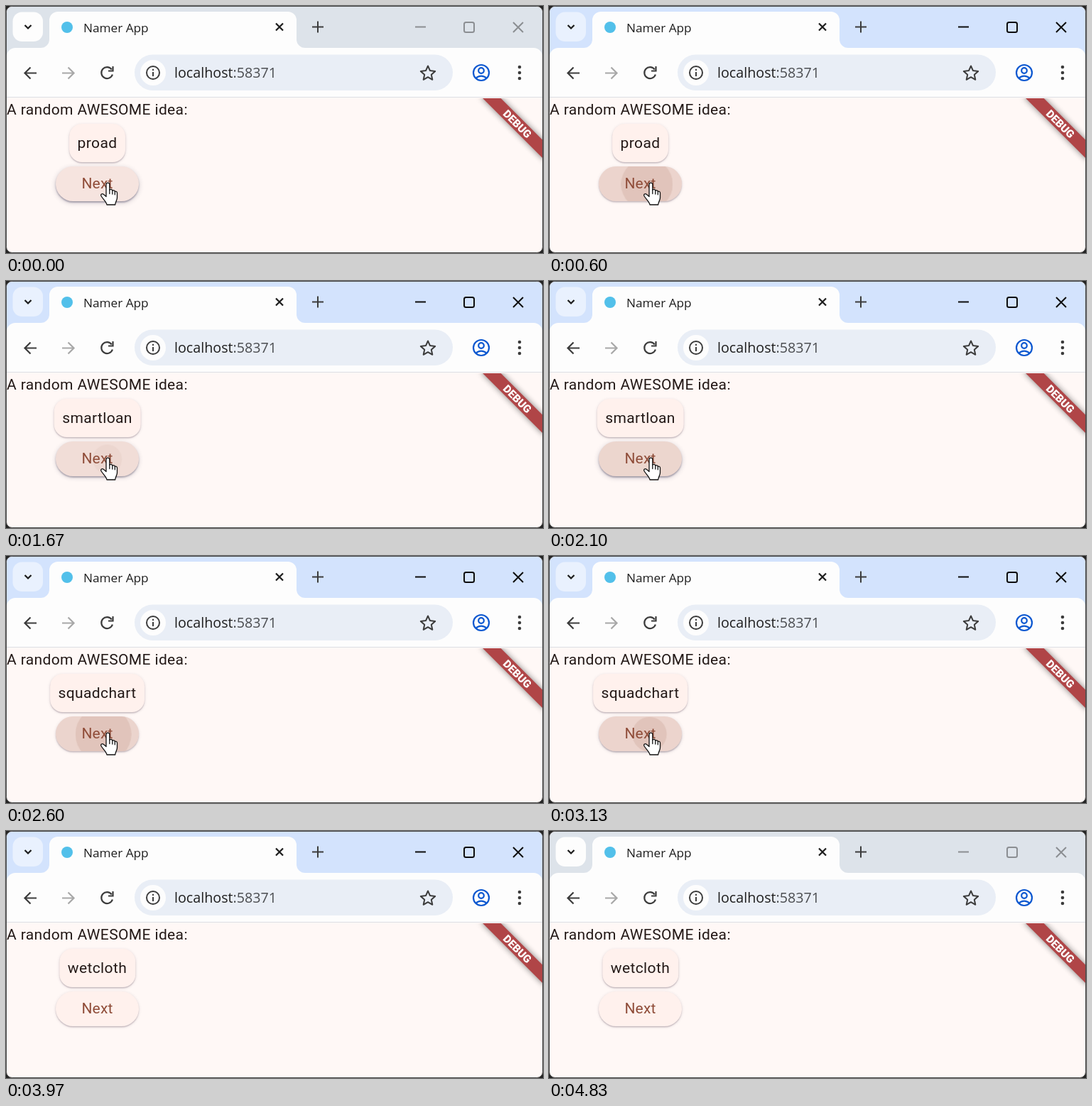
Animation, 756 px wide and 348 px high, one loop 4860 ms. Source, as an HTML page:

```html
<!DOCTYPE html>
<html lang="en">
<head>
<meta charset="utf-8">
<title>Namer App</title>
<style>
  html, body { margin: 0; width: 100%; height: 100%; overflow: hidden; background: #222; }
  :root {
    --loop: 4860ms;
    --flat: 0 1.5px 1.5px rgba(70, 50, 70, .24), 0 1px 4px rgba(70, 50, 70, .14);
    --raised: 0 2px 2px rgba(50, 45, 75, .32), 0 2px 7px rgba(50, 45, 75, .24);
  }
  #stage { position: absolute; left: 0; top: 0; width: 756px; height: 348px; overflow: hidden; }
  svg { position: absolute; left: 0; top: 0; }
  .ui { font-family: "Open Sans", "Noto Sans", sans-serif; }
  .app { font: 21px/30px Roboto, sans-serif; letter-spacing: .375px; color: #231917; white-space: nowrap; }
  .line { fill: none; stroke: #3c3c3c; stroke-width: 2; }

  /* Window focus */
  .strip { animation: strip var(--loop) step-end infinite; }
  .search { animation: search var(--loop) step-end infinite; }
  .controls { animation: controls var(--loop) step-end infinite; }
  @keyframes strip { 0%, 84.8% { fill: #dde3ea } 7.72% { fill: #d3e3fd } }
  @keyframes search { 0%, 84.8% { fill: #fdfdfd } 7.72% { fill: #e9f1fe } }
  @keyframes controls { 0%, 84.8% { stroke: #8b8e92 } 7.72% { stroke: #0d0d0d } }

  /* Page */
  .column { position: absolute; left: 1px; top: 131px; width: 255px; height: 200px; }
  .card {
    position: absolute; left: 50%; top: 35px; padding: 12px; border-radius: 18px;
    transform: translateX(-50%); background: #fff1ed; box-shadow: var(--flat); visibility: hidden;
  }
  .w1 { animation: w1 var(--loop) step-end infinite; }
  .w2 { animation: w2 var(--loop) step-end infinite; }
  .w3 { animation: w3 var(--loop) step-end infinite; }
  .w4 { animation: w4 var(--loop) step-end infinite; }
  .w5 { animation: w5 var(--loop) step-end infinite; }
  @keyframes w1 { 0% { visibility: visible } 12.86%, 100% { visibility: hidden } }
  @keyframes w2 { 0%, 26.85% { visibility: hidden } 12.86% { visibility: visible } }
  @keyframes w3 { 0%, 53.5% { visibility: hidden } 26.85% { visibility: visible } }
  @keyframes w4 { 0%, 67.39% { visibility: hidden } 53.5% { visibility: visible } }
  @keyframes w5 { 0% { visibility: hidden } 67.39%, 100% { visibility: visible } }

  .button {
    position: absolute; left: 69px; top: 95px; width: 117px; height: 49px; border-radius: 25px;
    animation: hover var(--loop) linear infinite, lift var(--loop) linear infinite;
  }
  .ink { position: absolute; inset: 0; border-radius: 25px; overflow: hidden; }
  .label {
    position: absolute; inset: 0; text-align: center; line-height: 49px;
    letter-spacing: .15px; color: #8f4c38;
  }
  @keyframes hover { 0%, 75% { background: #f6e4df } 77%, 100% { background: #fff1ed } }
  @keyframes lift {
    0%, 7.7%, 15.9%, 21.7%, 29.9%, 33.7%, 41.9%, 48.4%, 56.5%, 62.2%, 70.4%, 75% {
      box-shadow: var(--raised);
    }
    10.8%, 12.9%, 24.8%, 26.9%, 36.8%, 38.9%, 51.5%, 53.5%, 65.3%, 67.3%, 77.5%, 100% {
      box-shadow: var(--flat);
    }
  }

  /* Each press: tint plus growing ripple, shifted by --at */
  .press {
    position: absolute; inset: 0; background: rgba(143, 76, 56, .1); opacity: 0;
    animation: press var(--loop) linear calc(var(--at) - var(--loop)) infinite;
  }
  .press::after {
    content: ""; position: absolute; left: -68px; top: -43.5px; width: 136px; height: 136px;
    border-radius: 50%; background: rgba(143, 76, 56, .12);
    animation: ripple var(--loop) linear calc(var(--at) - var(--loop)) infinite;
  }
  @keyframes press {
    0% { opacity: 0 } 1.54%, 5.14% { opacity: 1 } 12.86%, 100% { opacity: 0 }
  }
  @keyframes ripple {
    0% { transform: translateX(73px) scale(.279) }
    2.06% { transform: translateX(71.6px) scale(.348) }
    4.12% { transform: translateX(68.7px) scale(.492) }
    5.14% { transform: translateX(67.1px) scale(.575); animation-timing-function: ease-out }
    9.77%, 100% { transform: translateX(58.5px) scale(1) }
  }

  .cursor { animation: leave var(--loop) linear infinite; }
  @keyframes leave {
    0%, 74.3% { transform: none; animation-timing-function: ease-in }
    79%, 100% { transform: translate(30px, 110px) }
  }
</style>
</head>
<body>
<div id="stage">
  <svg width="756" height="348" viewBox="0 0 756 348">
    <rect x=".5" y=".5" width="755" height="347" rx="8" fill="#fff8f6" stroke="#4b4b4b"/>
    <path class="strip" d="M1 80V9a8 8 0 0 1 8-8H747a8 8 0 0 1 8 8V80Z"/>
    <rect class="search" x="9.5" y="8.5" width="42.5" height="41.5" rx="13"/>
    <path class="line" d="M26.5 27l4.500 4.500 4.500-4.500" style="stroke:#1b1b1b;stroke-width:2.2"/>

    <!-- Tab and toolbar -->
    <path fill="#fdfdfd" d="M1 128V71a12 12 0 0 1 12-12H49a12 12 0 0 0 12-12V20a12 12 0 0 1 12-12H397a12 12 0 0 1 12 12V47a12 12 0 0 0 12 12H743a12 12 0 0 1 12 12V128Z"/>
    <path d="M1 128.500H755" stroke="#dcdfe5"/>
    <circle cx="86" cy="30" r="8" fill="#52c0ea"/>
    <text class="ui" x="109" y="37" font-size="17.2" fill="#1f1f1f">Namer App</text>
    <path class="line" d="M380 24.500l10 10m0-10l-10 10" style="stroke:#1b1b1b;stroke-width:2.2"/>
    <path class="line" d="M431 29.500h16m-8-8v16"/>
    <g class="controls" fill="none" stroke-width="2">
      <path d="M576 29.500h15M714 23l14 14m0-14l-14 14"/>
      <rect x="645" y="23" width="14" height="14" rx="2.5"/>
    </g>

    <path class="line" d="M43 94.500H27m7.500-8l-8 8 8 8" style="stroke-width:2.2"/>
    <path class="line" d="M79 94.500h16m-7.500-8l8 8-8 8" style="stroke:#a8a8a8;stroke-width:2.2"/>
    <path class="line" d="M148.700 89.300a8 8 0 1 0 1.200 7.200M150.500 85v6.500h-6.500" style="stroke-width:2.2"/>

    <rect x="181" y="68.500" width="448" height="50.500" rx="25.200" fill="#e9eef6"/>
    <circle cx="207" cy="94" r="18" fill="#fdfdfd"/>
    <circle class="line" cx="207" cy="94" r="9"/>
    <path class="line" d="M207 93v6m0-10.300v2.300"/>
    <text class="ui" x="237" y="101" font-size="19.7" fill="#1f1f1f">localhost<tspan fill="#4c4e52">:58371</tspan></text>
    <path class="line" stroke-linejoin="round" d="M594 84.500l3 6.600 7.200.8-5.400 4.800 1.500 7.100-6.300-3.600-6.300 3.600 1.500-7.100-5.400-4.800 7.200-.8Z"/>
    <g class="line" style="stroke:#0b57d0;stroke-width:2.2">
      <circle cx="669" cy="94" r="11"/>
      <circle cx="669" cy="91" r="3.8"/>
      <path d="M661.500 101.800c4-4.300 11-4.300 15 0"/>
    </g>
    <g fill="#3c3c3c">
      <circle cx="723" cy="86" r="2.3"/><circle cx="723" cy="94" r="2.3"/><circle cx="723" cy="102" r="2.3"/>
    </g>

    <!-- Corner ribbon -->
    <clipPath id="page"><path d="M1 130H755V347H1Z"/></clipPath>
    <g clip-path="url(#page)">
      <g transform="translate(756 130) rotate(45)">
        <rect x="-62" y="42" width="124" height="18" fill="#b04547" style="filter:drop-shadow(0 0 4.500px rgba(0,0,0,.5))"/>
        <text x="0" y="56.500" text-anchor="middle" font-family="Roboto, sans-serif" font-weight="900" font-size="15.3" fill="#fff">DEBUG</text>
      </g>
    </g>
  </svg>

  <div class="column app">
    <div>A random AWESOME idea:</div>
    <div class="card w1">proad</div>
    <div class="card w2">stillbeard</div>
    <div class="card w3">smartloan</div>
    <div class="card w4">squadchart</div>
    <div class="card w5">wetcloth</div>
    <div class="button">
      <div class="ink">
        <div class="press" style="--at:375ms"></div>
        <div class="press" style="--at:1055ms"></div>
        <div class="press" style="--at:1640ms"></div>
        <div class="press" style="--at:2350ms"></div>
        <div class="press" style="--at:3025ms"></div>
      </div>
      <div class="label">Next</div>
    </div>
  </div>

  <svg width="756" height="348" viewBox="0 0 756 348">
    <g class="cursor" stroke="#111" stroke-width="1.3" stroke-linejoin="round" stroke-linecap="round">
      <path fill="#fff" d="M141 251.500a2.400 2.400 0 0 1 4.800 0V259c1.500-1.200 3.600-.6 4 1 1.400-.8 3.200-.2 3.500 1.300 1.600-.6 3.200.4 3.200 2.200V270c0 4-2.500 5.500-2.800 10H142c-.6-4-5-7.500-7.800-12-1.500-2.600 1-4.400 3.300-2.600L141 268.500Z"/>
      <path fill="none" d="M145.800 259v5.500M149.800 260.500v4.500M153.300 261.800v4"/>
    </g>
  </svg>
</div>
</body>
</html>
```
